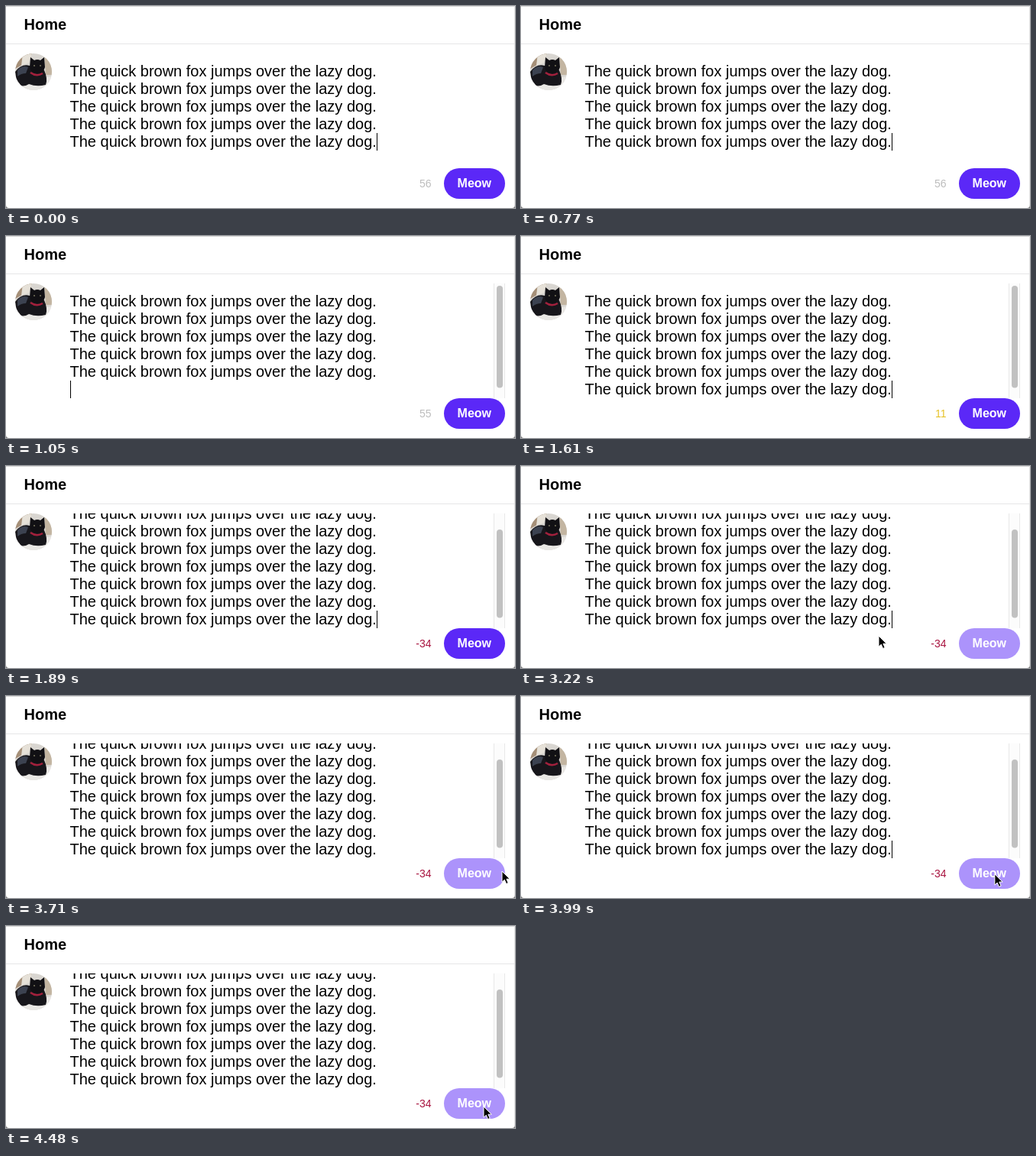
An HTML page that plays this animation: 666x264 px, repeating every 4.55 s.

```html
<!DOCTYPE html>
<html lang="en">
<head>
<meta charset="utf-8">
<title>Meow composer</title>
<style>
  html, body { margin: 0; width: 100%; height: 100%; overflow: hidden; background: #fff; }
  svg { display: block; width: 666px; height: 264px; font-family: "Liberation Sans", Arial, sans-serif; }
  .bold { font-weight: 700; }
</style>
</head>
<body>
<svg viewBox="0 0 666 264">
  <defs>
    <clipPath id="avatarClip"><circle cx="36" cy="86" r="24"/></clipPath>
    <clipPath id="boxClip"><rect x="72" y="62" width="582" height="150"/></clipPath>
  </defs>

  <rect width="666" height="264" fill="#fff"/>
  <path d="M0 .5H666" stroke="#d4d4d4"/>
  <path d="M665.5 0V264" stroke="#e4e4e4"/>
  <path d="M0 260V264H4Q0 264 0 260ZM666 260V264H662Q666 264 666 260Z" fill="#777"/>
  <path d="M0 49.5H665" stroke="#e6e6e8"/>
  <text class="bold" x="23.6" y="31" font-size="20">Home</text>

  <g clip-path="url(#avatarClip)">
    <rect x="12" y="62" width="48" height="48" fill="#d9d6d1"/>
    <path d="M12 62H34L30 72L12 82Z" fill="#a58f78"/>
    <path d="M22 62H34L30 74L20 78Z" fill="#e6e1d8"/>
    <path d="M50 62H60V90H52Z" fill="#c3b5a1"/>
    <path d="M12 98L60 92V110H12Z" fill="#e9e7e4"/>
    <path d="M12 86Q20 75 31 78L50 84Q55 95 52 103Q40 106 30 102Q22 107 14 102Z" fill="#17161b"/>
    <path d="M15 84Q21 77 29 80L26 88Q20 88 15 92Z" fill="#3c4250"/>
    <path d="M31 80L32 67L37 71Q41 69 45 71L50 67L51 80Q49 88 41 88Q33 88 31 80Z" fill="#111014"/>
    <path d="M32 87Q40 93 48 88" fill="none" stroke="#a3203c" stroke-width="2.5"/>
    <path d="M36 78h2M44 78h2" stroke="#77745c" stroke-width="1.5"/>
  </g>

  <g clip-path="url(#boxClip)">
    <g id="lines" font-size="20"></g>
    <g id="scrollbar">
      <rect x="638" y="62" width="15" height="150" fill="#fcfcfc"/>
      <path d="M638.5 62V212M652.5 62V212" stroke="#e8e8e8"/>
      <rect id="thumb" x="642" width="8" rx="4" fill="#c1c1c1"/>
    </g>
    <rect id="caret" width="1" height="23" fill="#000"/>
  </g>

  <text id="counter" x="556.5" y="237" font-size="14" text-anchor="end"></text>
  <rect id="button" x="573" y="212" width="80" height="40" rx="20" fill="#5b28f7"/>
  <text class="bold" x="590.6" y="237" font-size="16" fill="#fff">Meow</text>
  <path id="pointer" d="M0 0V14.2L3.3 11.2L5.6 16.5L8.2 15.4L5.9 10.2H10.3Z"
        fill="#000" stroke="#fff" stroke-width="1"/>
</svg>

<script>
const LOOP = 4550, STEP = 70;
const LINE_HEIGHT = 23, TOP = 74, LEFT = 83.5, LINE_WIDTH = 401.3;
const SENTENCE = "The quick brown fox jumps over the lazy dog.";
const LIMIT = 280;
const FADE_START = 1890, FADE_TIME = 140;

// Each edit: time, number of full sentences, whether an empty line follows.
const edits = [[0, 5, false], [910, 5, true], [1120, 6, false], [1680, 6, true], [1890, 7, false]];
// The caret is shown at first and flips at each of these times.
const caretFlips = [210, 770, 2450, 2940, 3430, 3990, 4480];
// Pointer path: time, x, y.
const pointerPath = [
  [3150, 468, 221], [3220, 468, 222], [3290, 500, 227], [3430, 606, 231], [3570, 650, 233],
  [3710, 649, 229], [3920, 610, 232], [4130, 648, 235], [4310, 612, 237], [4480, 625, 236]
];

const $ = id => document.getElementById(id);
const set = (id, attrs) => {
  for (const [name, value] of Object.entries(attrs)) $(id).setAttribute(name, value);
};
const show = (id, visible) => set(id, { visibility: visible ? "visible" : "hidden" });
const clamp = v => Math.max(0, Math.min(1, v));

const rows = Array.from({ length: 7 }, (_, i) => {
  const row = document.createElementNS("http://www.w3.org/2000/svg", "text");
  row.textContent = SENTENCE;
  row.setAttribute("x", LEFT);
  row.setAttribute("y", TOP + 18 + i * LINE_HEIGHT);
  return $("lines").appendChild(row);
});

function pointerAt(t) {
  const next = pointerPath.findIndex(p => p[0] >= t);
  if (next < 1) return pointerPath[0].slice(1);
  const [t0, x0, y0] = pointerPath[next - 1], [t1, x1, y1] = pointerPath[next];
  const k = (t - t0) / (t1 - t0), e = k * k * (3 - 2 * k);
  return [x0 + (x1 - x0) * e, y0 + (y1 - y0) * e];
}

function render(t) {
  const [, sentences, emptyLine] = edits.filter(e => e[0] <= t).pop();
  const lineCount = sentences + (emptyLine ? 1 : 0);
  const scroll = Math.max(0, lineCount - 6) * LINE_HEIGHT;
  const left = LIMIT - sentences * SENTENCE.length - (lineCount - 1);

  rows.forEach((row, i) => row.setAttribute("visibility", i < sentences ? "visible" : "hidden"));
  set("lines", { transform: `translate(0 ${-scroll})` });

  show("scrollbar", lineCount > 5);
  const thumbTop = scroll ? 83 : 65;
  set("thumb", { y: thumbTop, height: 198.5 - thumbTop });

  set("caret", {
    x: emptyLine ? 84 : Math.round(LEFT + LINE_WIDTH),
    y: TOP + (lineCount - 1) * LINE_HEIGHT - scroll
  });
  show("caret", caretFlips.filter(f => f <= t).length % 2 === 0);

  $("counter").textContent = left;
  set("counter", { fill: left < 0 ? "#a8123e" : left <= 20 ? "#e6c229" : "#bdbdbd" });
  set("button", { "fill-opacity": 1 - 0.5 * clamp((t - FADE_START) / FADE_TIME) });

  show("pointer", t >= pointerPath[0][0]);
  set("pointer", { transform: `translate(${pointerAt(t).join(" ")})` });
}

const start = performance.now();
function tick() {
  const t = (performance.now() - start) % LOOP;
  render(Math.floor(t / STEP) * STEP);
  requestAnimationFrame(tick);
}
tick();
</script>
</body>
</html>
```
